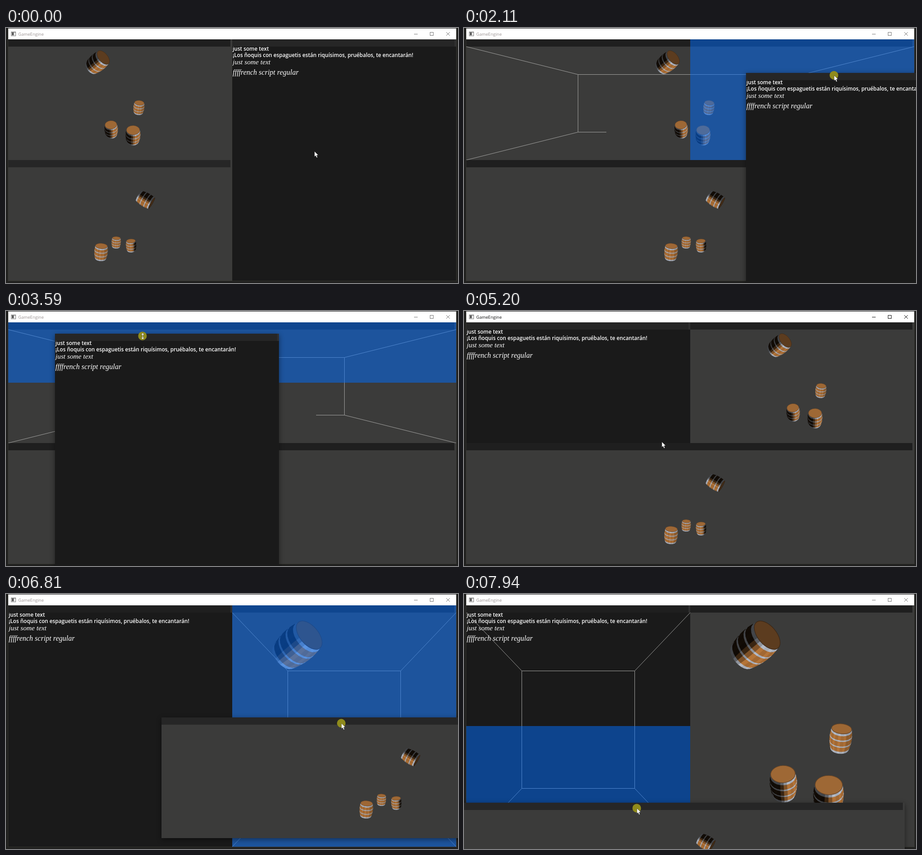
These frames come from a looping animation (997 by 562 pixels, 7.99 s). An HTML page with a canvas:

```html
<!DOCTYPE html>
<html lang="es">
<head>
<meta charset="utf-8">
<title>GameEngine</title>
<style>
  html, body { margin: 0; width: 100%; height: 100%; overflow: hidden; background: #20201f; }
  canvas { display: block; }
</style>
</head>
<body>
<canvas id="stage" width="997" height="562"></canvas>
<script>
const stage = document.getElementById('stage');
const buffer = document.createElement('canvas');
const screen2d = stage.getContext('2d'), buffer2d = buffer.getContext('2d');
let ctx = screen2d;

const LOOP = 7990, BAR = 16, SCENE_BG = '#3b3b3a';
const GRAB = 1320, DROP = 4620, REGRAB = 6240;

// Pointer key points: time, x, y
const POINTER = [
  [0, 680, 272], [490, 676, 34], [760, 688, 33], [1320, 693, 31],
  [2110, 816, 104], [2500, 650, 250], [2900, 300, 230], [3200, 160, 150],
  [3590, 301, 55], [3860, 301, 55], [4270, 120, 143], [4880, 120, 143],
  [5200, 436, 288], [5540, 410, 303], [6050, 402, 302], [6240, 402, 302],
  [6340, 425, 306], [7240, 947, 266.5], [7840, 410, 465], [7940, 381, 472]
];

// Barrels: x, y, size, tilt, flattening, shade (1 = dark left, -1 = dark right)
const SCENES = {
  high: [
    [41, 10, 10.7, 6, .5, -.2], [-20, 58.5, 13.1, -3, .7, 1],
    [28, 71.5, 14.6, 2, .7, 1], [-51, -89.5, 18, 50, .55, 1]
  ],
  low: [
    [-9, 41, 9, 3, .4, -.1], [24, 48, 10, -3, .45, -1],
    [-42.5, 62.5, 13.2, 4, .45, -.2], [55, -54, 14, 120, .15, 1]
  ]
};

const clamp = (v, lo = 0, hi = 1) => Math.min(hi, Math.max(lo, v));
const tone = (rgb, b) => `rgb(${rgb.map(c => Math.round(c * b))})`;

function half([x, y, w, h], side) {
  if (side === 'left' || side === 'right') return [side === 'left' ? x : x + w / 2, y, w / 2, h];
  return [x, side === 'top' ? y : y + h / 2, w, h / 2];
}

const AREA = [5, 25, 988, 532];
const [LEFT, RIGHT, TOP, BOTTOM] = ['left', 'right', 'top', 'bottom'].map(s => half(AREA, s));

function layoutAt(t) {
  if (t < GRAB) return { high: half(LEFT, 'top'), low: half(LEFT, 'bottom'), text: RIGHT };
  if (t < DROP) return { high: TOP, low: BOTTOM };
  if (t < REGRAB) return { text: half(TOP, 'left'), high: half(TOP, 'right'), low: BOTTOM };
  return { text: LEFT, high: RIGHT };
}

function dragAt(t) {
  if (t >= GRAB && t < DROP) return { name: 'text', from: GRAB, w: 494, h: 532, dx: 193.5, dy: 5.5 };
  if (t >= REGRAB) return { name: 'low', from: REGRAB, w: 988, h: 266, dx: 397, dy: 12.5 };
}

// Smooth curve through the key points that never overshoots them
function follow(keys, t, axis) {
  const last = keys.length - 1;
  if (t >= keys[last][0]) return keys[last][axis];
  const slope = i => (keys[i + 1][axis] - keys[i][axis]) / (keys[i + 1][0] - keys[i][0]);
  const tangent = i => {
    if (i === 0 || i === last) return slope(Math.min(i, last - 1));
    const a = slope(i - 1), b = slope(i);
    return a * b <= 0 ? 0 : 2 * a * b / (a + b);
  };
  const i = keys.findIndex(k => k[0] > t) - 1;
  const span = keys[i + 1][0] - keys[i][0], p = (t - keys[i][0]) / span, q = 1 - p;
  return keys[i][axis] * q * q * (1 + 2 * p) + keys[i + 1][axis] * p * p * (1 + 2 * q)
    + span * p * q * (tangent(i) * q - tangent(i + 1) * p);
}

function rect(x, y, w, h, color) {
  ctx.fillStyle = color;
  ctx.fillRect(x, y, w, h);
}

function path(points, close) {
  ctx.beginPath();
  points.forEach(([x, y]) => ctx.lineTo(x, y));
  if (close) ctx.closePath();
}

function barrel([x, y, size, tilt, flat, shade]) {
  const height = 1.18 * size * Math.sqrt(1 - flat * flat), staves = 12;
  const rings = [-1, -.78, -.38, -.25, .22, .35, .8, 1];
  const radius = t => size * (1 - .06 * (t + 1) + .16 * (1 - t * t));
  const point = (t, a) => [radius(t) * Math.cos(a), t * height + radius(t) * flat * Math.sin(a)];
  const lid = .35 + .5 * clamp(Math.cos(tilt * Math.PI / 180) * 2 - 1);
  ctx.save();
  ctx.translate(x, y);
  ctx.rotate(tilt * Math.PI / 180);
  ctx.lineWidth = .25;
  for (let i = 0; i < staves; i++) {
    const a = i * Math.PI / staves, b = a + Math.PI / staves;
    const facing = clamp(Math.cos((a + b) / 2) * Math.sign(shade) * 2 + .5 + (shade < 0 ? 1 : 0));
    const light = (1 - .9 * Math.abs(shade) * (1 - facing)) * (i % 2 ? .9 : 1);
    for (let j = 0; j < rings.length - 1; j++) {
      const t0 = rings[j], t1 = rings[j + 1], mid = (t0 + t1) / 2;
      path([point(t0, a), point(t0, b), point(mid, b), point(t1, b), point(t1, a), point(mid, a)], true);
      ctx.fillStyle = ctx.strokeStyle =
        j % 2 ? tone([180, 116, 56], light) : tone([180, 186, 198], .3 + .7 * light);
      ctx.fill();
      ctx.stroke();
    }
  }
  ctx.beginPath();
  ctx.ellipse(0, -height, size, size * flat, 0, 0, 7);
  ctx.fillStyle = tone([186, 122, 62], lid);
  ctx.fill();
  ctx.lineWidth = .6;
  ctx.strokeStyle = tone([120, 80, 45], lid);
  ctx.stroke();
  ctx.restore();
}

function texts(x, y) {
  const line = (s, dy, font) => {
    ctx.font = font;
    ctx.fillText(s, x + 1, y + dy);
  };
  const plain = '600 11.7px "Open Sans", sans-serif';
  const script = size => `italic ${size}px "Liberation Serif", serif`;
  ctx.fillStyle = '#fff';
  line('just some text', 9, plain);
  line('¡Los ñoquis con espaguetis están riquísimos, pruébalos, te encantarán!', 23, plain);
  line('just some text', 39, script(15.3));
  line('ffffrench script regular', 62, script(16));
}

function panel(name, [x, y, w, h], active) {
  const isText = name === 'text', top = y + BAR, ch = h - BAR;
  ctx.save();
  rect(x, top, w, ch, isText ? '#1a1a1a' : SCENE_BG);
  rect(x, y, w - 4, BAR, active ? '#262626' : '#1f1f1f');
  rect(x + w - 4, y, 4, BAR, isText ? '#2f2f2f' : SCENE_BG);
  ctx.beginPath();
  ctx.rect(x, top, w, ch);
  ctx.clip();
  if (isText) {
    texts(x, top);
  } else {
    ctx.translate(x + w / 2, top + ch / 2);
    ctx.scale(ch / 250, ch / 250);
    SCENES[name].forEach(barrel);
  }
  ctx.restore();
}

function dockGuide(area, mx, my) {
  const [x, y, w, h] = area, top = y + BAR, ch = h - BAR, r = x + w, b = y + h;
  const l1 = Math.floor(x + w / 4) - .5, t1 = Math.floor(top + ch / 4) - .5;
  const r1 = Math.ceil(r - w / 4) + .5, b1 = Math.ceil(b - ch / 4) + .5;
  ctx.save();
  ctx.beginPath();
  ctx.rect(...area);
  ctx.clip();
  ctx.strokeStyle = '#a2a2a0';
  ctx.lineWidth = 1;
  [
    [[x, top], [l1, t1], [l1, b1], [x, b]],
    [[r, top], [r1, t1], [r1, b1], [r, b]],
    [[l1, t1], [r1, t1]],
    [[l1, b1], [l1 + ch / 4, b1]],
    [[r1, b1], [r1 - ch / 4, b1]]
  ].forEach(line => { path(line); ctx.stroke(); });
  const u = (mx - x) / w * 2 - 1, v = (my - top) / ch * 2 - 1;
  const side = Math.abs(u) > Math.abs(v) ? (u > 0 ? 'right' : 'left') : (v > 0 ? 'bottom' : 'top');
  const inner = Math.max(Math.abs(u), Math.abs(v)) < .5;
  rect(...(inner ? area : half(area, side)), 'rgba(0,110,255,.5)');
  ctx.restore();
}

// Drawn off screen first, so that the opening window fades as one piece
function floatingPanel({ name, from, w, h, dx, dy }, t, mx, my) {
  const open = clamp((t - from) / 165), s = .965 + .035 * open;
  buffer.width = w;
  buffer.height = h;
  ctx = buffer2d;
  panel(name, [0, 0, w, h], true);
  ctx = screen2d;
  ctx.save();
  ctx.globalAlpha = open;
  ctx.translate(Math.round(mx - dx) + w / 2, Math.round(my - dy) + h / 2);
  ctx.scale(s, s);
  ctx.shadowColor = `rgba(0,0,0,${open === 1 ? .45 : 0})`;
  ctx.shadowBlur = 12;
  ctx.shadowOffsetY = 3;
  ctx.drawImage(buffer, -w / 2, -h / 2);
  ctx.restore();
}

function titleBar(focused) {
  rect(5, 1, 988, 24, '#fff');
  rect(11, 8, 11, 10, '#8c8c8c');
  rect(12, 10, 9, 7, '#e4e4e4');
  rect(13, 10, 4, 6, '#555');
  ctx.fillStyle = focused ? '#111' : '#9a9292';
  ctx.font = '9.5px "Open Sans", sans-serif';
  ctx.fillText('GameEngine', 27, 16.5);
  ctx.strokeStyle = focused ? '#111' : '#777';
  ctx.lineWidth = 1;
  ctx.strokeRect(935.5, 9.5, 7, 7);
  [[[900, 13.5], [908, 13.5]], [[971, 9], [979, 17]], [[979, 9], [971, 17]]]
    .forEach(line => { path(line); ctx.stroke(); });
}

function pointer(x, y, pressed, resizing) {
  if (pressed) {
    ctx.beginPath();
    ctx.arc(x, y, 9.5, 0, 7);
    ctx.fillStyle = '#8f8b1c';
    ctx.fill();
  }
  ctx.save();
  ctx.translate(x + .5, y + .5);
  ctx.fillStyle = '#fff';
  ctx.strokeStyle = 'rgba(0,0,0,.6)';
  ctx.lineWidth = .6;
  path(resizing
    ? [[0, -7], [3.5, -3], [.8, -3], [.8, 3], [3.5, 3], [0, 7], [-3.5, 3], [-.8, 3], [-.8, -3], [-3.5, -3]]
    : [[0, 0], [0, 11.5], [2.6, 9.2], [4.6, 13.8], [6.6, 12.9], [4.7, 8.4], [8.3, 8.2]], true);
  ctx.fill();
  ctx.stroke();
  ctx.restore();
}

function draw(t) {
  const mx = follow(POINTER, t, 1), my = follow(POINTER, t, 2);
  const drag = dragAt(t), panels = Object.entries(layoutAt(t));
  rect(0, 0, 997, 562, '#20201f');
  rect(4, 1, 990, 557, '#34342e');
  titleBar(t >= DROP && t < REGRAB);
  panels.forEach(([name, area]) =>
    panel(name, area, !drag && (name === 'text' || (t < GRAB && name === 'low'))));
  if (drag) {
    const over = panels.find(([, [x, y, w, h]]) => mx >= x && mx < x + w && my >= y && my < y + h);
    if (over) dockGuide(over[1], mx, my);
    floatingPanel(drag, t, mx, my);
  }
  pointer(mx, my, drag || (t >= 6050 && t < REGRAB), t >= 3560 && t < 3860);
}

function tick() {
  draw(performance.now() % LOOP);
  requestAnimationFrame(tick);
}
tick();
</script>
</body>
</html>
```
